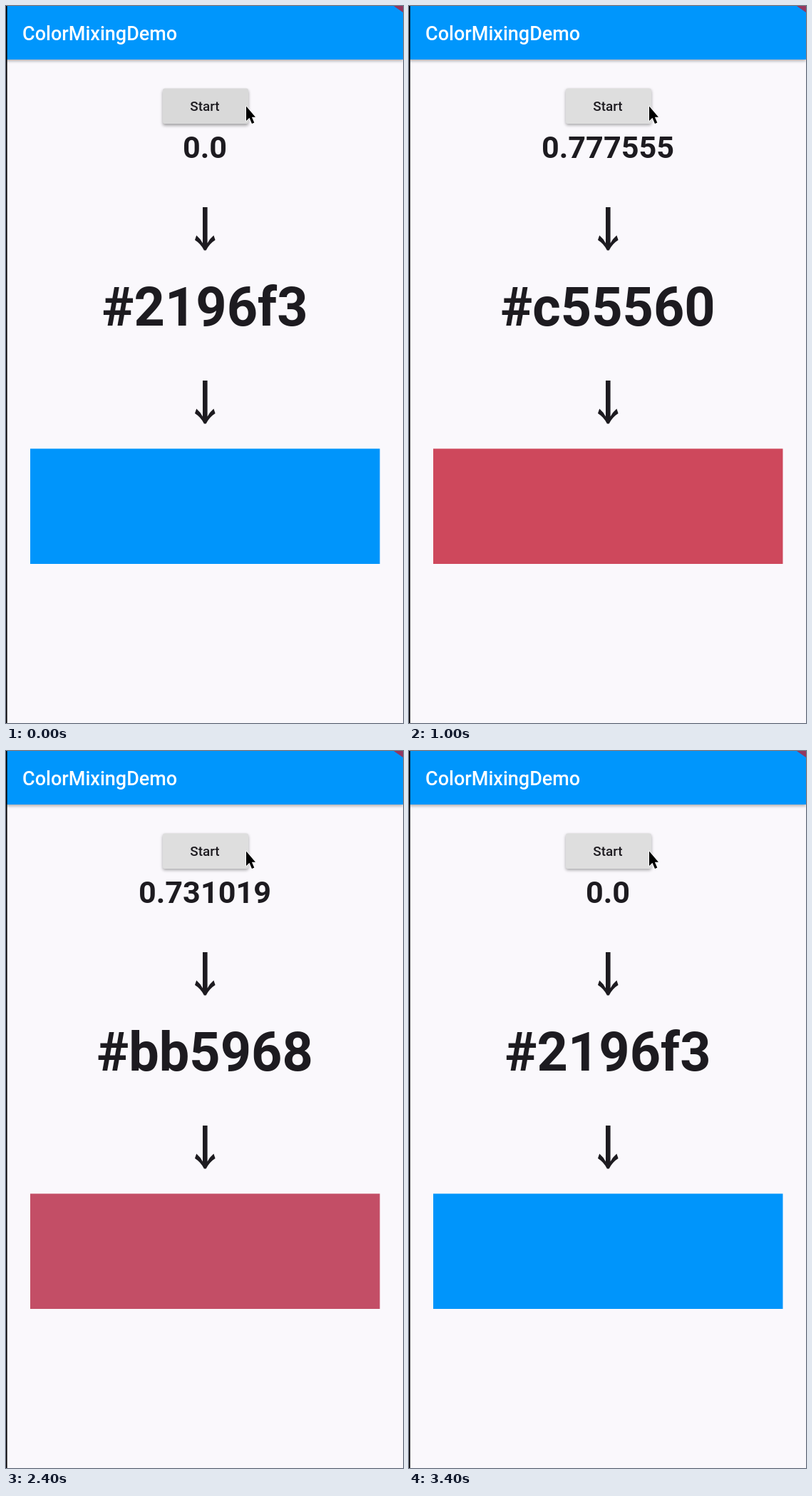
An HTML page that plays this animation: 557 by 1005 pixels, repeating every 3.5 s.

```html
<!DOCTYPE html>
<html lang="en">
<head>
<meta charset="utf-8">
<title>ColorMixingDemo</title>
<style>
  html, body { margin: 0; width: 100%; height: 100%; overflow: hidden; background: #faf8fc; }
  svg { display: block; width: 100vw; height: 100vh; }
  text { font-family: Roboto, sans-serif; fill: #1d1b20; }
  .mid { text-anchor: middle; }
</style>
</head>
<body>
<svg viewBox="0 0 557 1005" preserveAspectRatio="none">
  <defs>
    <filter id="soft" x="-20%" y="-40%" width="140%" height="180%">
      <feGaussianBlur stdDeviation="2"/>
    </filter>
    <clipPath id="face"><rect x="220" y="115.5" width="120" height="49.5" rx="2.7"/></clipPath>
    <path id="arrow" d="M276 282h6.6v50.5Q286 326 291.4 321.5L293.6 328Q285 333.500 280.700 342.500H277.900Q273.600 333.500 265 328L267.200 321.500Q272.600 326 276 332.500Z" fill="#1d1b20"/>
  </defs>
  <rect width="557" height="1005" fill="#faf8fc"/>

  <rect x="0" y="4" width="557" height="73" fill="#000" opacity=".32" filter="url(#soft)"/>
  <rect width="557" height="75" fill="#0096fc"/>
  <path d="M544 0H557V9Z" fill="#93375f"/>
  <text x="23" y="47.500" font-size="27" font-weight="500" style="fill:#fff">ColorMixingDemo</text>
  <rect width="1.600" height="1005" fill="#000"/>

  <rect id="shadow" x="220" width="120" height="49.500" rx="2.700" filter="url(#soft)"/>
  <rect id="button" x="220" y="115.500" width="120" height="49.500" rx="2.700"/>
  <circle id="splash" cx="336" cy="143" clip-path="url(#face)"/>
  <text id="label" class="mid" x="279" y="147" font-size="18.900" font-weight="500"></text>

  <text id="value" class="mid" x="279" y="213.300" font-size="43.200" font-weight="700"></text>
  <use href="#arrow"/>
  <text id="hex" class="mid" x="279" y="448" font-size="75.600" font-weight="700"></text>
  <use href="#arrow" y="243"/>
  <rect id="swatch" x="34" y="620.500" width="490.500" height="161.500"/>

  <path d="M337 140.500V161L341.500 156.800L345 165L348.300 163.600L344.900 155.700H350Z"
        fill="#000" stroke="#fff" stroke-width="1.500" stroke-linejoin="round" paint-order="stroke"/>
</svg>
<script>
const LOOP = 3500, STEP = 100;
const $ = id => document.getElementById(id);
const clamp = v => Math.min(1, Math.max(0, v));
const lerp = (a, b, p) => a + (b - a) * p;
const set = (id, attrs) => {
  for (const k in attrs) $(id).setAttribute(k, attrs[k]);
};

const progress = t => clamp(t < 1600
  ? 0.365804 + (t - 600) * 0.0010293775
  : 0.731019 - (t - 2400) * 0.0009951325);

function hexCode(p) {
  const part = (a, b) => Math.floor(lerp(a, b, p)).toString(16).padStart(2, "0");
  return "#" + part(33, 244) + part(150, 67) + part(243, 54);
}

// Wide-gamut screen rendition of the same blend
function screenColor(p) {
  const r = 255 * p ** 0.85;
  const g = lerp(149, 45, p) + 25 * p * (1 - p);
  return `rgb(${[r, g, lerp(251, 47, p)].map(Math.round)})`;
}

function drawButton(t) {
  const d = t < 1600 ? t - 100 : t - 2000;
  const press = d < 0 ? clamp(1 + d / 170) : clamp(1 - (d - 100) / 250);
  const grey = Math.round(lerp(222, 211, press));
  set("button", { fill: `rgb(${grey},${grey},${grey})` });
  set("shadow", { y: lerp(117.5, 119, press), opacity: lerp(0.34, 0.42, press) });
  set("splash", {
    r: d < 0 ? 0 : 8 + d * 0.28,
    opacity: d < 0 ? 0 : 0.08 * clamp(1 - (d - 100) / 250)
  });
}

function draw(t) {
  const p = progress(t);
  $("value").textContent = p === 0 || p === 1 ? p.toFixed(1) : p.toFixed(6);
  $("hex").textContent = hexCode(p);
  $("label").textContent = p === 1 ? "Reverse" : "Start";
  set("swatch", { fill: screenColor(p) });
  drawButton(t);
}

const start = performance.now();
function tick() {
  const t = (performance.now() - start) % LOOP;
  draw(Math.floor(t / STEP) * STEP);
  requestAnimationFrame(tick);
}
draw(0);
requestAnimationFrame(tick);
</script>
</body>
</html>
```
